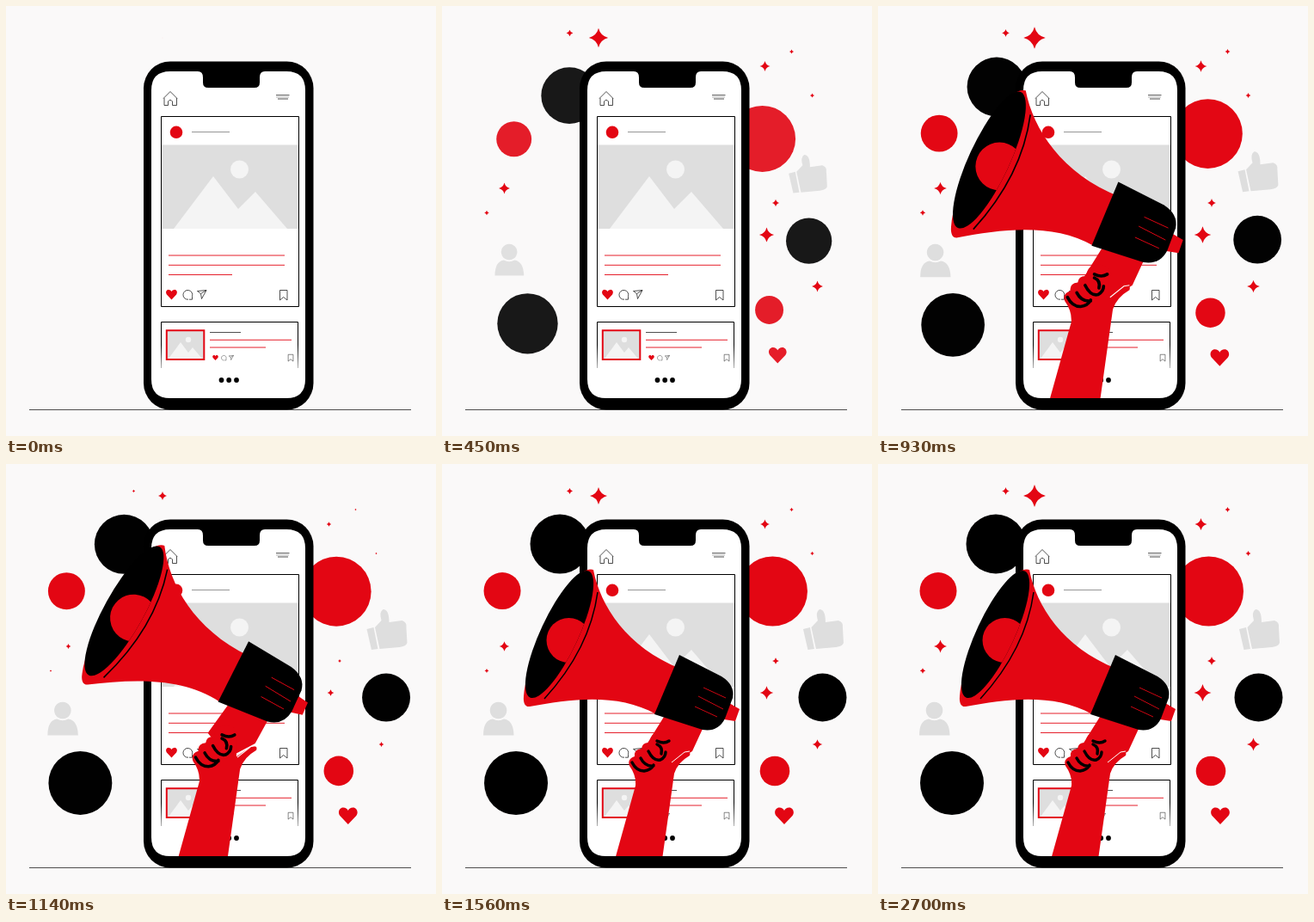
Recreate the animation shown at these times as an HTML page. Size 500x500 px, loop 2730 ms.

```html
<!DOCTYPE html>
<html lang="en">
<head>
<meta charset="utf-8">
<title>Social media marketing</title>
<style>
  html, body { margin: 0; height: 100%; overflow: hidden; background: #faf9f9; }
  svg { display: block; width: 100%; height: 100%; }
  .red { fill: #e30613; }
  .grey { fill: #dedede; }
  .pale { fill: #f4f4f4; }
  .line { fill: none; stroke: #222; stroke-width: .8; }
  .redline { fill: none; stroke: #e30613; stroke-width: .9; }
</style>
</head>
<body>
<svg viewBox="0 0 500 500">
  <defs>
    <path id="heart" d="M0 10L-9.5 0C-13-5-9-10-5.5-9.5C-3-9.5-1-8 0-6C1-8 3-9.5 5.5-9.5C9-10 13-5 9.5 0Z"/>
    <path id="star" d="M0-1Q.2-.2 1 0Q.2.2 0 1Q-.2.2-1 0Q-.2-.2 0-1Z"/>
    <g id="tools">
      <use href="#heart" class="red" transform="translate(192.5 335.5) scale(.59)"/>
      <path class="line" d="M212 341.2A5.4 5.4 0 1 1 216.5 337.5V341.2H213M222.5 331.5L233 330.5L227.5 340.5L226.5 334.5ZM226.5 334.5L233 330.5"/>
    </g>
    <path id="bookmark" class="line" d="M318.5 330.5H327V342L322.7 338.5L318.5 342Z"/>
    <linearGradient id="fade" x1="0" y1="367" x2="0" y2="421" gradientUnits="userSpaceOnUse">
      <stop offset=".5"/><stop offset="1" stop-opacity=".3"/>
    </linearGradient>
    <clipPath id="above"><path d="M0 0H500V456H0Z"/></clipPath>
    <clipPath id="mouth"><ellipse cx="136.500" cy="198" rx="22" ry="81" transform="rotate(25 136.500 198)"/></clipPath>
  </defs>

  <path class="line" d="M27 469.500H471"/>
  <g id="stars" class="red"></g>

  <g id="icons">
    <circle cx="137" cy="93" r="34.500" data-from="114 114"/>
    <circle class="red" cx="70" cy="147.500" r="21.500" data-from="140 74"/>
    <circle cx="86" cy="371" r="37" data-from="138 -17"/>
    <circle cx="442.500" cy="271.500" r="28" data-from="-162 17"/>
    <circle class="red" cx="387" cy="357" r="17.300" data-from="-66 -36"/>
    <circle class="red" cx="384.500" cy="148" r="40.500" data-from="-122 66"/>
    <path class="grey" data-from="-184 28" d="M420 192L428 190L433 215L425.500 216ZM429.500 190L437 182Q434 172 439 169Q446 169 446 184L461 182Q467 184 466 190L467 208Q466 212 458 213L435 215Z"/>
    <g class="red" data-from="-79 -31"><use href="#heart" x="398" y="409"/></g>
    <path class="grey" data-from="129 -10" d="M65.500 276.700A9.800 9.800 0 1 1 65.490 276.700ZM48 315.500Q48 298 59 296.500Q65.500 300 72 296.500Q83 298 83.500 315.500Z"/>
  </g>

  <g id="phone">
    <rect x="160" y="64.500" width="197.500" height="405" rx="31"/>
    <path fill="#fff" d="M191 76H223Q229 76 229 83V89Q229 95 235 95H289Q295 95 295 89V83Q295 76 301 76H326Q348 76 348 98V434Q348 456 326 456H191Q169 456 169 434V98Q169 76 191 76Z"/>
    <path class="line" d="M183 107.500L191 99.500L199 107.500M184 107V115.500H188.500V111Q191 107.500 193.500 111V115.500H198.500V107M314 103.700H329.500M316 108H328"/>
    <path class="line" opacity=".4" d="M314 106H329"/>

    <path fill="none" stroke="#000" d="M180.500 128.500H340.500V349.500H180.500Z"/>
    <circle class="red" cx="198" cy="146.800" r="7.300"/>
    <path class="line" opacity=".6" d="M216 146.500H260"/>
    <path class="grey" d="M181 161.500H340V259H181Z"/>
    <circle class="pale" cx="271.500" cy="190" r="10.500"/>
    <path class="pale" d="M195 259L241 198L270 236L290 216L327 259Z"/>
    <path class="redline" d="M189 290H324M189 301.300H324M189 312.500H263"/>
    <use href="#tools"/>
    <use href="#bookmark"/>

    <path fill="none" stroke="url(#fade)" d="M180.500 421V367.500H339.500V421"/>
    <path class="grey" d="M187 377.500H230V411H187Z"/>
    <circle class="pale" cx="212" cy="388" r="3.200"/>
    <path class="pale" d="M189 410L203 391L212 403L217 397L228 410Z"/>
    <path fill="none" stroke="#e30613" stroke-width="2" d="M186.800 377.300H230.300V411H186.800Z"/>
    <path class="line" d="M237 379.500H273"/>
    <path class="redline" d="M237 388.300H332M237 397H302"/>
    <use href="#tools" transform="translate(243.500 409) scale(.52) translate(-192.500 -335.500)"/>
    <use href="#bookmark" transform="translate(331 409) scale(.68) translate(-322.700 -336)"/>
    <circle cx="250.500" cy="435" r="2.900"/>
    <circle cx="259.200" cy="435" r="2.900"/>
    <circle cx="268" cy="435" r="2.900"/>
  </g>

  <g clip-path="url(#above)">
    <g id="megaphone">
      <g id="horn">
        <path class="red" d="M258 294L303 308L291 334L262 352L238 326ZM334 278L346 285L341 299L328 297Z"/>
        <path class="red" d="M176 123C184 165 215 213 277 238L249 291C205 266 150 273 102 282Q94 283 95 270C98 235 125 165 160 128Q170 121 176 123Z"/>
        <g clip-path="url(#mouth)">
          <path d="M90 110H190V290H90Z"/>
          <circle class="red" cx="147.500" cy="205" r="26"/>
        </g>
        <path fill="none" stroke="#000" stroke-width="1.500" d="M181 149Q172 215 119 273"/>
        <path d="M276 222L325 247Q341 257 338 272L329 296Q321 312 303 309L247 291Z"/>
        <path class="redline" stroke-width="1.300" d="M304 260L330 272M298 270L327 285M294 282L320 294"/>
      </g>
      <path class="red" d="M201 460L225 374Q226 362 218 351Q215 343 224 340Q223 332 232 331Q233 323 242 324Q241 314 251 312Q266 310 266 322L266 346L282 335Q290 333 288 339Q274 347 270 360L256 460Z"/>
      <path fill="none" stroke="#fff" d="M267 347L282 335L288 334"/>
      <path fill="none" stroke="#000" stroke-width="3.400" stroke-linecap="round" d="M221 347Q226 357 235 357Q243 356 246 350M231 342Q236 352 246 351M240 334Q246 346 254 344Q260 341 260 335M250 326Q257 329 255 337M250 322Q258 326 264 322"/>
    </g>
  </g>
</svg>

<script>
const LOOP = 2730;
const $ = id => document.getElementById(id);

// x, y, radius
const stars = [
  [182, 37, 13], [148.5, 31.5, 4.5], [375.5, 70, 7], [406.5, 53, 3], [430.5, 104, 3],
  [72.5, 212, 7.5], [52, 240.5, 3.2], [388, 229, 5], [377.5, 266, 10], [436.5, 326, 7.5]
].map(([x, y, r]) => {
  const el = document.createElementNS('http://www.w3.org/2000/svg', 'use');
  el.setAttribute('href', '#star');
  $('stars').append(el);
  return { el, x, y, r };
});

const icons = [...$('icons').children].map(el => {
  const box = el.getBBox();
  const [dx, dy] = el.dataset.from.split(' ').map(Number);
  return { el, dx, dy, x: box.x + box.width / 2, y: box.y + box.height / 2 };
});

const progress = (t, start, length) => Math.min(1, Math.max(0, (t - start) / length));
const backOut = p => 1 + 2.7 * (p - 1) ** 3 + 1.7 * (p - 1) ** 2;

function twinkle(t) {
  const grown = 555, period = 357.5;
  if (t < grown) return (t / grown) ** 0.73;
  return 0.625 + 0.375 * Math.cos((t - grown) / period * 2 * Math.PI);
}

function draw(t) {
  const size = twinkle(t);
  for (const { el, x, y, r } of stars)
    el.setAttribute('transform', `translate(${x} ${y}) scale(${r * size})`);

  const left = Math.exp(-t / 194);
  for (const { el, dx, dy, x, y } of icons) {
    el.setAttribute('transform',
      `translate(${x + dx * left} ${y + dy * left}) scale(${1 - left / 2}) translate(${-x} ${-y})`);
    el.setAttribute('opacity', 1 - left);
  }

  const scale = Math.max(0, backOut(progress(t, 620, 665)));
  const turn = 40 * (backOut(progress(t, 600, 900)) - 1);
  $('megaphone').setAttribute('transform', `translate(229 458) scale(${scale}) translate(-229 -458)`);
  $('horn').setAttribute('transform', `rotate(${turn} 325 270)`);
}

const begin = performance.now();
function tick() {
  draw((performance.now() - begin) % LOOP);
  requestAnimationFrame(tick);
}
tick();
</script>
</body>
</html>
```
